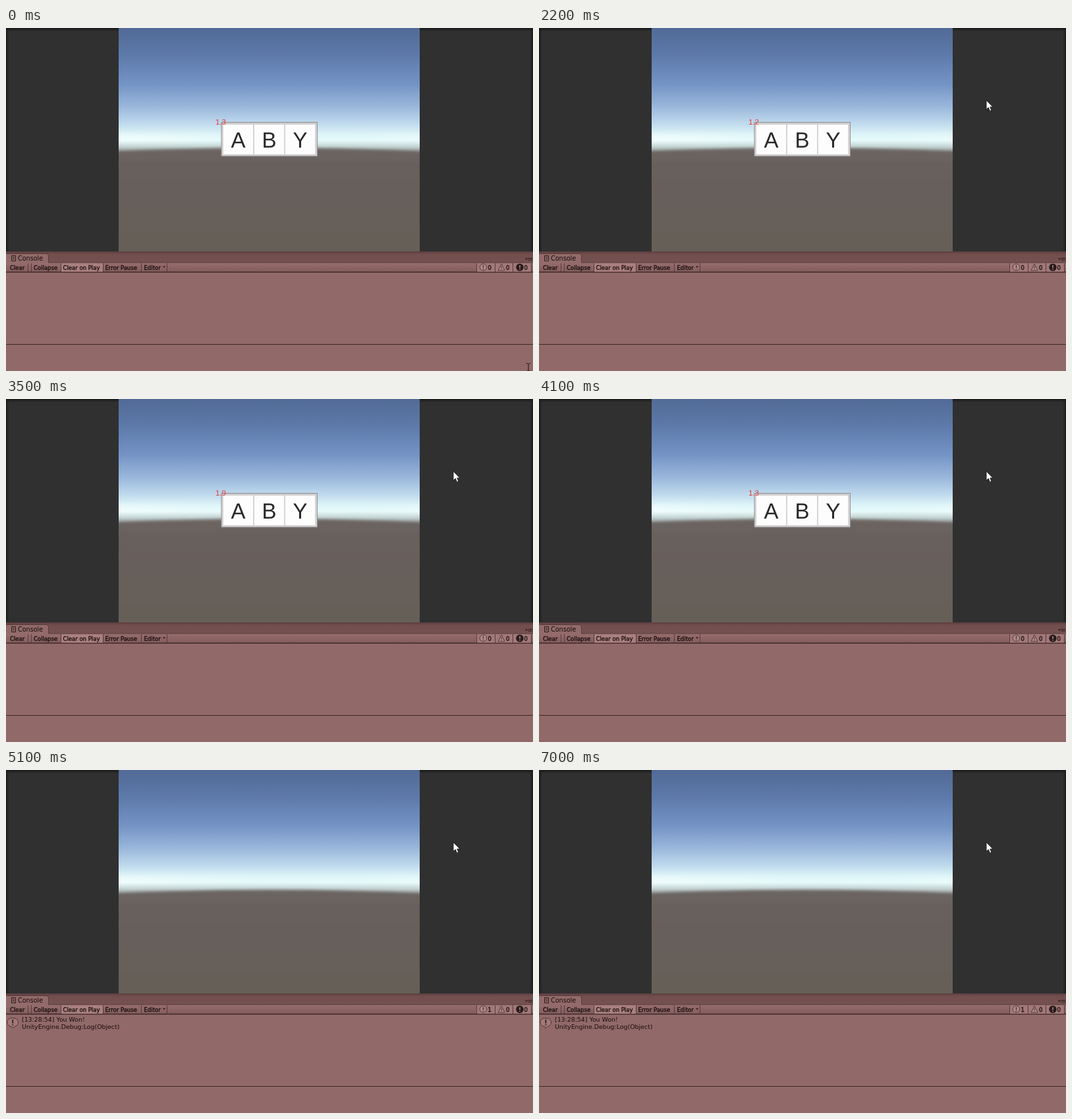
Recreate the animation shown at these times as an HTML page. Size 800 by 522 pixels, loop 7.1 s.

```html
<!DOCTYPE html>
<html lang="en">
<head>
<meta charset="utf-8">
<title>Letter sequence game</title>
<style>
  html, body { margin: 0; width: 100%; height: 100%; overflow: hidden; background: #303030; }
  svg { display: block; width: 100vw; height: 100vh; }
  text { font-family: "DejaVu Sans", sans-serif; fill: #160d0d; white-space: pre; }
  .game text { font-family: "Liberation Sans", Arial, sans-serif; text-anchor: middle; }
  .letter { font-size: 33px; fill: #292929; }
  .game .timer { font-size: 11.5px; fill: #e43a38; }
  .bar text { font-size: 8.5px; stroke: #160d0d; stroke-width: .3px; }
  .log text { font-size: 9.4px; }
</style>
</head>
<body>
<svg viewBox="0 0 800 522" preserveAspectRatio="none">
  <defs>
    <linearGradient id="sky" x2="0" y2="190" gradientUnits="userSpaceOnUse">
      <stop stop-color="#526a96"/>
      <stop offset=".22" stop-color="#5d7aaa"/>
      <stop offset=".45" stop-color="#7494c5"/>
      <stop offset=".62" stop-color="#98b5da"/>
      <stop offset=".76" stop-color="#bed8ec"/>
      <stop offset=".85" stop-color="#dcf4f8"/>
      <stop offset=".9" stop-color="#e6fbfa"/>
      <stop offset=".95" stop-color="#c3d3d3"/>
      <stop offset="1" stop-color="#8d9190"/>
    </linearGradient>
    <linearGradient id="ground" x2="0" y1="182" y2="340" gradientUnits="userSpaceOnUse">
      <stop stop-color="#6d6663"/>
      <stop offset=".2" stop-color="#67605c"/>
      <stop offset="1" stop-color="#665e59"/>
    </linearGradient>
    <linearGradient id="sideGlow">
      <stop stop-color="#fff" stop-opacity=".55"/>
      <stop offset=".45" stop-color="#fff" stop-opacity="0"/>
      <stop offset=".8" stop-color="#fff" stop-opacity="0"/>
      <stop offset="1" stop-color="#fff" stop-opacity=".3"/>
    </linearGradient>
    <linearGradient id="strip" x2="0" y2="1">
      <stop stop-color="#5c3e3e"/>
      <stop offset=".25" stop-color="#724e4e"/>
      <stop offset="1" stop-color="#765151"/>
    </linearGradient>
    <linearGradient id="tools" x2="0" y2="1">
      <stop stop-color="#976d6d"/>
      <stop offset="1" stop-color="#845d5d"/>
    </linearGradient>
    <linearGradient id="panel" x2="0" y2="1">
      <stop stop-color="#cfcdcf"/>
      <stop offset=".3" stop-color="#d8d6d8"/>
      <stop offset="1" stop-color="#d6d4d5"/>
    </linearGradient>
    <linearGradient id="shadeX">
      <stop stop-color="#1c1c1c"/>
      <stop offset="1" stop-color="#1c1c1c" stop-opacity="0"/>
    </linearGradient>
    <linearGradient id="shadeY" x2="0" y2="1">
      <stop stop-color="#181818"/>
      <stop offset="1" stop-color="#181818" stop-opacity="0"/>
    </linearGradient>
    <filter id="soft" x="-10%" y="-20%" width="120%" height="140%"><feGaussianBlur stdDeviation="2"/></filter>
    <filter id="glow" x="-10%" y="-100%" width="120%" height="300%"><feGaussianBlur stdDeviation="4"/></filter>
    <clipPath id="view"><rect x="171" width="457" height="340"/></clipPath>
  </defs>

  <rect width="800" height="522" fill="#303030"/>
  <rect width="5" height="340" fill="url(#shadeX)"/>
  <rect width="5" height="340" fill="url(#shadeX)" transform="matrix(-1 0 0 1 800 0)"/>
  <rect width="800" height="5" fill="url(#shadeY)"/>

  <g class="game">
    <g clip-path="url(#view)">
      <rect x="171" width="457" height="195" fill="url(#sky)"/>
      <rect x="161" y="162" width="477" height="11" fill="url(#sideGlow)" filter="url(#glow)"/>
      <path d="M140 189Q400 176 660 189V360H140Z" fill="url(#ground)" filter="url(#soft)"/>
    </g>
    <g id="board">
      <rect x="327" y="143.5" width="145.5" height="51.5" fill="url(#panel)" stroke="#8f8e8f"/>
      <g id="tiles"></g>
      <text id="timer" class="timer" x="326" y="147"></text>
    </g>
  </g>

  <rect y="340" width="800" height="182" fill="#926969"/>
  <rect y="340" width="800" height="17" fill="url(#strip)"/>
  <path d="M0 344H62L64.5 346V357H0Z" fill="#936a6a"/>
  <path d="M0 343.5H62L64.5 346V357" fill="none" stroke="#583c3c"/>
  <rect y="357" width="800" height="14" fill="url(#tools)"/>
  <path d="M64 357H800" stroke="#5b3f3f"/>
  <path d="M0 371.5H800" stroke="#3d2929" stroke-width="1.3"/>
  <path d="M0 481.5H800" stroke="#3b2828"/>
  <path d="M8.5 346.5H14.5V354.5H8.5ZM10 349H13M10 351.5H13" fill="none" stroke="#2b1a1a"/>
  <text x="18" y="354" font-size="9.6">Console</text>
  <path d="M788 350.5H792L790 353Z" fill="#281919"/>
  <path d="M792.5 350.5H799M792.5 353H799" stroke="#281919" stroke-width="1.2"/>

  <g class="bar">
    <rect x="84" y="358" width="63" height="13" fill="#aa7f7f"/>
    <rect x="715" y="358" width="82" height="13" fill="#a27878"/>
    <g id="buttons"></g>
    <path d="M238 362.5H242L240 365Z" fill="#281919"/>
    <ellipse cx="724.5" cy="364" rx="5.3" ry="5" fill="#b18989" stroke="#4a3131" stroke-width=".9"/>
    <path d="M724.5 361V365M724.5 366V367.2" stroke="#3d2828" stroke-width="1.2"/>
    <path d="M752 359L757 369H747Z" fill="#b18989" stroke="#4a3131" stroke-width=".9"/>
    <path d="M752 362.5V366M752 367V368" stroke="#3d2828"/>
    <circle cx="780" cy="364.3" r="5.7" fill="#291b1b"/>
    <path d="M780 361V365M780 366.3V367.7" stroke="#c09a9a" stroke-width="1.4"/>
    <text id="count" x="731.5" y="367.5">0</text>
    <text x="759" y="367.5">0</text>
    <text x="786.5" y="367.5">0</text>
  </g>

  <g id="log" class="log">
    <path d="M10 377.5C15 377.5 18.5 380 18.5 384C18.5 387.5 16 390 12.5 390.5L10 393L8.5 390.5C4.5 390 2 387.5 2 384C2 380 5 377.5 10 377.5Z" fill="#a27878" stroke="#4d3333"/>
    <path d="M10.3 379.8V385.5M10.3 386.8V388.6" stroke="#2b1a1a" stroke-width="1.7"/>
    <text x="24" y="383">[13:28:54] You Won!</text>
    <text x="24" y="394">UnityEngine.Debug:Log(Object)</text>
  </g>

  <path id="beam" d="M790 510.5H792L793 511.5L794 510.5H796M793 511V522M790 522H796" fill="none" stroke="#1d1212"/>
  <path id="arrow" d="M0 0V14L3.2 11L5.6 16.4L8 15.3L5.7 10.2H10Z" fill="#fff" stroke="#151515" stroke-width=".9" stroke-linejoin="round"/>
</svg>

<script>
const LOOP = 7100, STEP = 100, WIN = 4800;
const $ = id => document.getElementById(id);
const show = (el, on) => el.setAttribute('visibility', on ? 'visible' : 'hidden');

function add(parent, tag, attrs, text = '') {
  const el = document.createElementNS('http://www.w3.org/2000/svg', tag);
  for (const key in attrs) el.setAttribute(key, attrs[key]);
  el.textContent = text;
  parent.append(el);
  return el;
}

const letters = [0, 1, 2].map(i => {
  const x = 330 + i * 47;
  const tile = add($('tiles'), 'g', {});
  add(tile, 'rect', { x, y: 147, width: 45, height: 45, fill: '#fdfdfd' });
  return { tile, label: add(tile, 'text', { class: 'letter', x: x + 22.5, y: 181.5 }) };
});

for (const [x, label] of [[6, 'Clear'], [42, 'Collapse'], [86.5, 'Clear on Play'], [150.5, 'Error Pause'], [209.5, 'Editor']])
  add($('buttons'), 'text', { x, y: 367.5 }, label);
for (const x of [33.5, 38.5, 83.5, 147.5, 205.5, 244.5, 714.5, 742.5, 769.5, 797.5])
  add($('buttons'), 'path', { d: `M${x} 358V371`, stroke: '#593d3d' });

// [time, x, y] of the pointer tip
const pointerPath = [[0, 793, 512], [100, 788, 490], [300, 752, 370], [500, 700, 205], [700, 674, 118], [900, 672, 107], [1100, 672, 107], [1500, 679, 110]];
// [time, letters left to press]
const sequence = [[0, 'ABY'], [4200, 'BY'], [4500, 'Y'], [WIN, '']];

function pointerAt(t) {
  const next = pointerPath.findIndex(p => p[0] > t);
  if (next < 0) return pointerPath.at(-1).slice(1);
  const [a, b] = [pointerPath[next - 1], pointerPath[next]];
  const k = (t - a[0]) / (b[0] - a[0]);
  return [1, 2].map(i => a[i] + (b[i] - a[i]) * k);
}

// Two-second countdown that restarts at 1400 and 3400 ms
const secondsLeft = t => t < 1400 ? 1.34 - t * .00093 : 2 - (t - 1400) % 2000 / 1000;

function draw(t) {
  const won = t >= WIN;
  const left = sequence.findLast(s => s[0] <= t)[1];
  letters.forEach(({ tile, label }, i) => {
    tile.setAttribute('display', left[i] ? 'inline' : 'none');
    label.textContent = left[i] || '';
  });
  $('timer').textContent = secondsLeft(t).toFixed(1);
  $('count').textContent = won ? 1 : 0;
  show($('board'), !won);
  show($('log'), won);
  show($('beam'), t < 100);
  show($('arrow'), t >= 100);
  $('arrow').setAttribute('transform', `translate(${pointerAt(t)})`);
}

const start = performance.now();
function frame() {
  const t = (performance.now() - start) % LOOP;
  draw(Math.floor(t / STEP) * STEP);
  requestAnimationFrame(frame);
}
frame();
</script>
</body>
</html>
```
